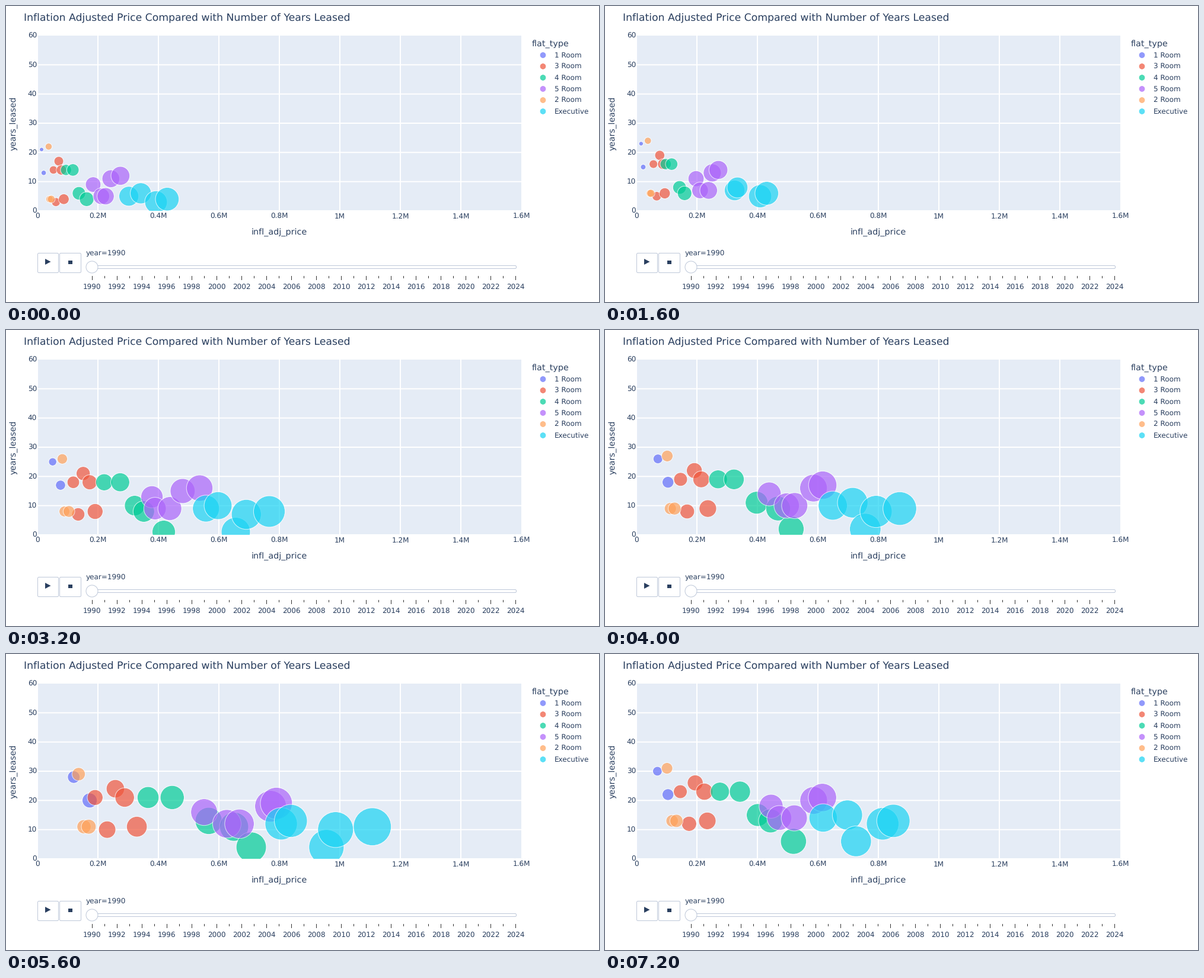
A matplotlib script that plays this animation: 1000x500 px, repeating every 8000 ms.

```python
import random

import matplotlib.pyplot as plt
import numpy as np
from matplotlib.animation import FuncAnimation
from matplotlib.patches import Circle, FancyBboxPatch, Polygon, Rectangle

plt.rcParams["font.family"] = "DejaVu Sans"
plt.rcParams["text.hinting"] = "none"

DPI = 100
PX = 72 / DPI  # points per pixel
INK, BORDER, PLOT_BG = "#2a3f5f", "#bec8d9", "#e5ecf6"
LEFT, RIGHT, TOP, BOTTOM = 53, 869, 50, 346
PX_PER_MILLION = 510
PX_PER_LEASE_YEAR = (BOTTOM - TOP) / 60
RADIUS_AT_MILLION = 30.4
FIRST_YEAR, YEAR_COUNT, YEAR_MS = 1990, 10, 800

# Name, colour, peak price in millions, market sensitivity, price spread and
# the years leased at the start, from the cheapest flat to the dearest.
FLAT_TYPES = [
    ("1 Room", "#636efa", 0.147, 1.9, 0.20, (21, 13)),
    ("3 Room", "#ef553b", 0.26, 1.15, 0.25, (14, 3, 17, 14, 4)),
    ("4 Room", "#00cc96", 0.55, 1.25, 0.32, (14, 14, 6, 4, -3)),
    ("5 Room", "#ab63fa", 0.69, 1.0, 0.17, (9, 5, 5, 11, 12)),
    ("2 Room", "#ffa15a", 0.157, 1.2, 0.12, (22, 4, 4)),
    ("Executive", "#19d3f3", 0.94, 0.85, 0.15, (5, 6, -3, 3, 4)),
]

fig = plt.figure(figsize=(1000 / DPI, 500 / DPI), dpi=DPI, facecolor="white")
ax = fig.add_axes([0, 0, 1, 1])
ax.set(xlim=(0, 1000), ylim=(500, 0))
ax.axis("off")


def label(x, y, text, size=12, ha="left", **kw):
    ax.text(x, y, text, fontsize=size * PX, color=INK, ha=ha,
            **{"va": "baseline", **kw})


def segment(xs, ys, color, width=1):
    ax.plot(xs, ys, color=color, lw=width * PX, solid_capstyle="butt",
            snap=False, zorder=1)


def box(x, y, w, h):
    ax.add_patch(FancyBboxPatch((x, y), w, h, fc="white", ec=BORDER, lw=PX, zorder=2,
                                boxstyle="round,pad=0,rounding_size=2"))


def marker(x, y, r, color, clip=None):
    """Translucent disc with a white rim that does not overlap its fill."""
    parts = [Circle((x, y), r - 0.5, fc=color, ec="none", alpha=0.7, zorder=3),
             Circle((x, y), r, fc="none", ec="white", lw=PX, alpha=0.7, zorder=3)]
    for part in parts:
        ax.add_patch(part)
        if clip is not None:
            part.set_clip_path(clip)
    return parts


def draw_chart():
    plot = Rectangle((LEFT, TOP), RIGHT - LEFT, BOTTOM - TOP, fc=PLOT_BG, ec="none", zorder=0)
    ax.add_patch(plot)
    for i in range(9):
        x = LEFT + PX_PER_MILLION * i / 5
        if i < 8:
            segment([x, x], [TOP, BOTTOM], "white", 2)
        text = f"{i / 5:.1f}M" if i % 5 else f"{i // 5}M" if i else "0"
        label(x, 359.3, text, ha="center")
    for lease in range(0, 61, 10):
        y = BOTTOM - lease * PX_PER_LEASE_YEAR
        if lease < 60:
            segment([LEFT, RIGHT], [y, y], "white", 2)
        label(52, y + 4, str(lease), ha="right")
    label(30, 25, "Inflation Adjusted Price Compared with Number of Years Leased", 17.2)
    label(461, 386, "infl_adj_price", 14.4, ha="center")
    label(13, 198, "years_leased", 14, ha="center", va="center", rotation=90)
    label(887, 68, "flat_type", 14.4)
    for i, (name, color, *_) in enumerate(FLAT_TYPES):
        y = 83 + 19 * i
        marker(905.5, y, 5.5, color)
        label(925, y + 4.3, name)
    return plot


def draw_controls():
    box(53.5, 417.5, 35, 33)
    box(90.5, 417.5, 36, 33)
    ax.add_patch(Polygon([(66, 427), (66, 437), (75.5, 432)], fc=INK, ec="none", zorder=3))
    ax.add_patch(Rectangle((105, 429.5), 6.5, 6.5, fc=INK, ec="none", zorder=3))
    label(135, 422, "year=1990")
    box(140.5, 438.5, 720, 5)
    ax.add_patch(Circle((145, 441), 10, fc="white", ec=BORDER, lw=PX, zorder=3))
    for i in range(35):
        x = 145 + 21 * i
        major = i % 2 == 0
        segment([x + 0.5] * 2, [456, 463 if major else 460], "#333333")
        if major:
            label(x, 479.3, str(FIRST_YEAR + i), ha="center")


def market(t):
    """Price level relative to its peak: flat, a boom, then a decline."""
    return np.interp(t, [0, 2, 4, 7, 9], [0.33, 0.34, 0.64, 1, 0.77])


def flats_in(t):
    """Colour, price in millions and years leased of each flat after t years."""
    rng = random.Random(FIRST_YEAR + t)
    for _, color, peak, sensitivity, spread, leases in FLAT_TYPES:
        typical = peak * market(t) ** sensitivity
        factors = np.linspace(1 - spread, 1 + spread, len(leases))
        for factor, start in zip(factors, leases):
            price = typical * factor * rng.uniform(0.96, 1.04)
            if start + t >= 0:
                yield color, price, start + t


plot_area = draw_chart()
draw_controls()
bubbles = []


def update(frame):
    while bubbles:
        bubbles.pop().remove()
    for color, price, lease in flats_in(frame):
        x = LEFT + price * PX_PER_MILLION
        y = BOTTOM - lease * PX_PER_LEASE_YEAR
        bubbles.extend(marker(x, y, RADIUS_AT_MILLION * price ** 0.5, color, plot_area))
    return bubbles


anim = FuncAnimation(fig, update, frames=YEAR_COUNT, interval=YEAR_MS,
                     init_func=lambda: update(0), repeat=True, repeat_delay=0)
plt.show()
```
